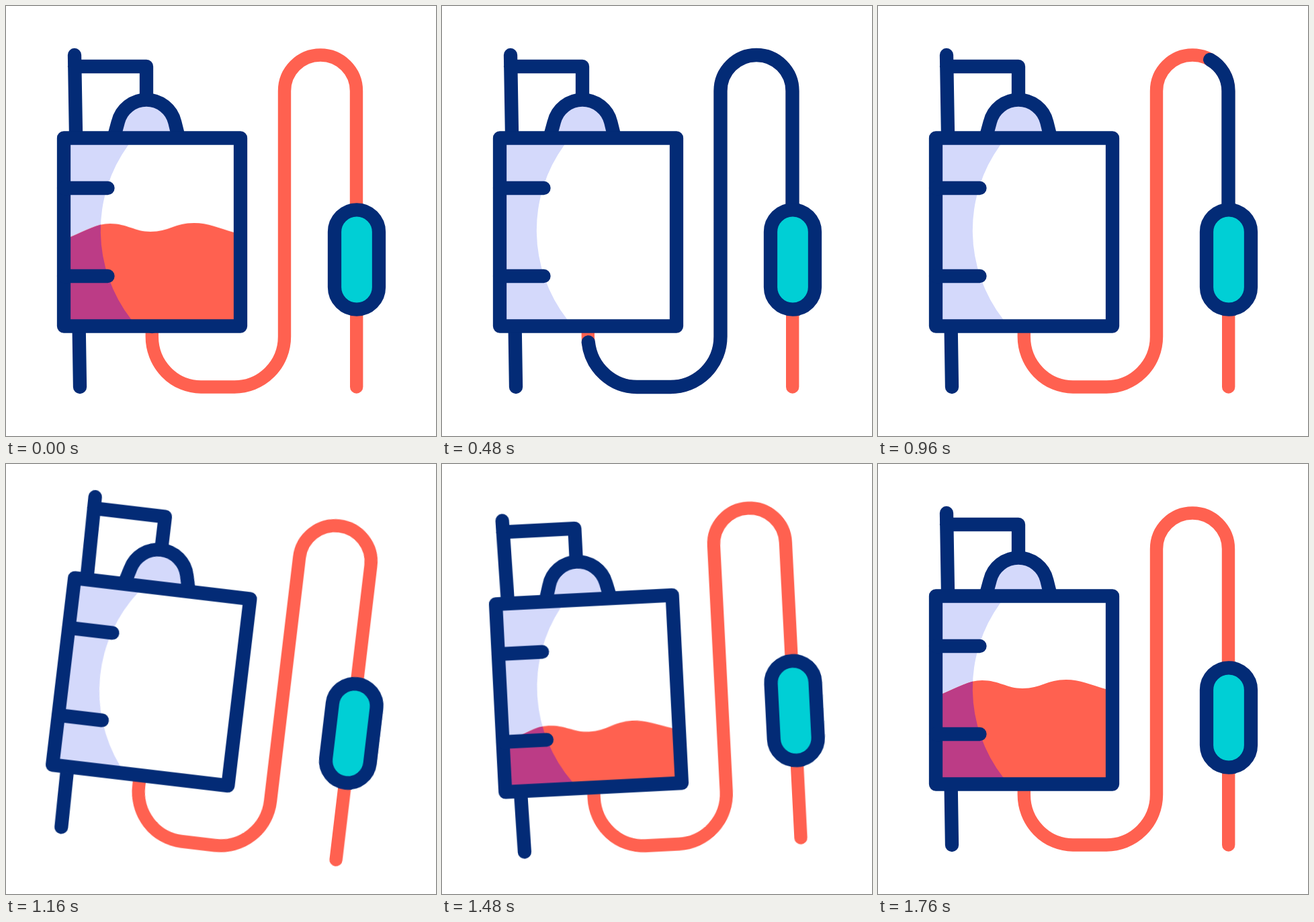
An HTML page that plays this animation: 640x640 px, repeating every 2 s.

```html
<!DOCTYPE html>
<html lang="en">
<head>
<meta charset="utf-8">
<title>Infusion bag</title>
<style>
  :root { --navy: #032b76; --red: #ff6150; --plum: #bc3c86; --mist: #d4d9fb; --teal: #00cfd5; }
  html, body { margin: 0; width: 100%; height: 100%; overflow: hidden; background: #fff; }
  svg { display: block; width: 100%; height: 100%; }

  .line { fill: none; stroke: var(--navy); stroke-width: 20.3; stroke-linecap: round; stroke-linejoin: round; }
  .hose { fill: none; stroke: var(--red); stroke-width: 19.4; stroke-linecap: round; }
  .mist { fill: var(--mist); }
  .teal { fill: var(--teal); }

  .swing, .liquid, .flow { animation: 2s cubic-bezier(.167, 0, .833, 1) infinite; }
  .swing {
    transform-origin: 320px 320px;
    animation-name: swing;
    animation-timing-function: cubic-bezier(.333, 0, .667, 1);
  }
  .liquid { animation-name: level; }
  .flow { animation-name: flow; }

  @keyframes swing {
    0%, 48% { transform: rotate(0deg); }
    61.333% { transform: rotate(8deg); }
    74.667% { transform: rotate(-3deg); }
    88%, 100% { transform: rotate(0deg); }
  }
  /* The bag drains, stays empty, then refills. */
  @keyframes level {
    0%, 88%, 100% { transform: translateY(0); }
    24%, 48% { transform: translateY(185px); }
  }
  /* The dash grows along the hose, then slides off its far end. */
  @keyframes flow {
    0% { stroke-dasharray: 0 200; stroke-dashoffset: 0; }
    22% { stroke-dasharray: 100 200; stroke-dashoffset: 0; }
    58%, 100% { stroke-dasharray: 100 200; stroke-dashoffset: -100; }
  }
</style>
</head>
<body>
<svg viewBox="0 0 640 640">
  <defs>
    <path id="hose" pathLength="100" d="M217.3 477V492A73 75 0 0 0 290 567H340A74.5 75 0 0 0 414.5 492V126.500A53.500 53.500 0 0 1 521.500 126.500V310"/>
    <path id="liquid" d="M80 349L96 342C118 333 135 322 155 322C180 322 192 334 215 334C242 334 252 321 280 321C300 321 318 329 339 335L355 339V490H80Z"/>
    <path id="shade" d="M86 196.500H189L182 207A216 216 0 0 0 186 466L194 476.500H86Z"/>
    <clipPath id="inside"><rect x="86" y="196.500" width="263" height="280"/></clipPath>
    <clipPath id="shaded"><use href="#shade"/></clipPath>
  </defs>

  <g class="swing">
    <use href="#hose" class="hose"/>
    <path class="hose" d="M521.700 450V567"/>
    <use href="#hose" class="line flow"/>
    <rect class="line" style="fill: var(--teal)" x="489" y="303.300" width="66" height="148.300" rx="33"/>

    <path class="line" d="M102 73L104 190M108.600 477L110 567M102 90H209V140"/>
    <path class="line" style="fill: var(--mist)" d="M161.500 192L166.700 173A43.500 43.500 0 0 1 251.300 173L256 192"/>

    <use href="#shade" class="mist"/>
    <g clip-path="url(#inside)">
      <use href="#liquid" class="liquid" fill="var(--red)"/>
      <g clip-path="url(#shaded)">
        <use href="#liquid" class="liquid" fill="var(--plum)"/>
      </g>
    </g>
    <rect class="line" x="86" y="196.500" width="263" height="280"/>
    <path class="line" d="M86 271H151.500M86 402H151.500"/>
  </g>
</svg>
</body>
</html>
```
